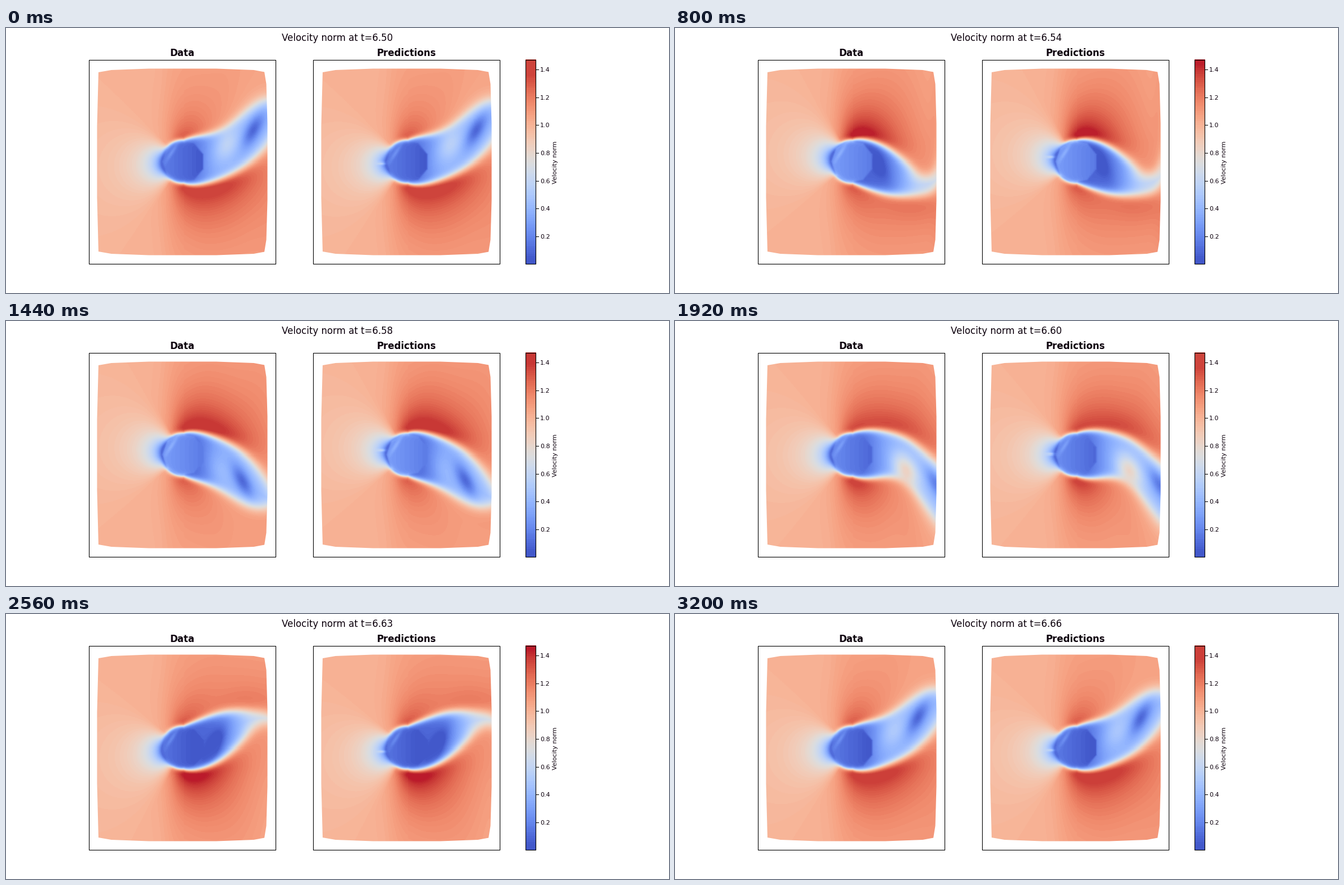
Recreate the animation shown at these times as a matplotlib script. Size 1183x473 px, loop 3.36 s.

```python
import numpy as np
import matplotlib
import matplotlib.pyplot as plt
from matplotlib.animation import FuncAnimation
from matplotlib.patches import Polygon, Rectangle

W, H, DPI = 1183, 473, 100
FRAMES, INTERVAL = 21, 160
PERIOD = 20.5            # shedding period, in frames
HALF = PERIOD / 2
VMAX, LEVELS = 1.469, 100
CX, CY, R = 316, 239, 37
EDGE = 38                # wake half width right at the cylinder
SHIFT = 400              # distance between the two panels
X0, X1, Y0, Y1 = 162, 468, 71, 407
INK = "#0c000c"

plt.rcParams["font.family"] = "DejaVu Sans"

xs = np.arange(X0, X1) + 0.5
X, Y = np.meshgrid(xs, np.arange(Y0, Y1) + 0.5)
DX, DY = X - CX, Y - CY
RAD = np.hypot(DX, DY)


def wave(k, peak, period=PERIOD):
    return np.cos(2 * np.pi * (k - peak) / period)


def sigmoid(v):
    return 0.5 * (1 + np.tanh(v / 2))


def blob(x, y, side, long, short, tilt=62):
    """Slanted Gaussian; side 1 leans up to the right, -1 down."""
    c, s = np.cos(np.radians(tilt)), -side * np.sin(np.radians(tilt))
    u = (X - x) * c + (DY - y) * s
    v = -(X - x) * s + (DY - y) * c
    return np.exp(-0.5 * ((u / long) ** 2 + (v / short) ** 2))


def facet_mask(sides=9):
    """Soft mask of the faceted cylinder."""
    dist = np.full(X.shape, -1e3)
    for n in range(sides):
        a = 2 * np.pi * (n + 0.5) / sides + np.pi
        flat = R * np.cos(np.pi / sides)
        dist = np.maximum(dist, DX * np.cos(a) + DY * np.sin(a) - flat)
    return sigmoid(-dist / 0.8)


FACETS = facet_mask()


def borders(k):
    """Upper and lower wake border for every pixel column."""
    run = np.maximum(xs - CX, 0)
    u = run / 152
    # the centre line flaps ever wider, later and more abruptly downstream
    lag = -3.7 + 3 * (np.maximum(run - 24, 0) / 128) ** 2
    snap = 0.1 + 2 * u
    centre = -72 * u ** 1.5 * np.tanh(snap * wave(k, lag)) / np.tanh(snap)
    # the wake pinches twice per period
    half = EDGE + 7 * (1 - np.exp(-run / 20)) - 18 * u ** 2
    half = half + 25 * u ** 2.3 * wave(k, 1.8 - 6.5 * (1 - u), HALF)
    nose = np.minimum(xs - CX, 0)
    half = np.where(xs < CX, np.sqrt(np.maximum(EDGE ** 2 - nose ** 2, 0)), half)
    return centre - half, centre + half


def fast_flow(out, age):
    """Extra speed outside one border; out is the distance from it."""
    life = (age % PERIOD) / PERIOD
    far = np.maximum(out, 0)
    fade = np.where(out > 0, np.exp(-np.maximum(out - 10, 0) / 60),
                    np.exp(np.minimum(out, 0) / 15))

    def hump(x, spread):
        return np.exp(-0.5 * ((X - x) / (spread + 0.5 * far)) ** 2)

    shoulder = 0.22 * hump(308, 33)
    patch = (0.42 * np.sin(np.pi * life ** 0.65)
             * hump(320 + 170 * life ** 1.5, 35 + 50 * life))
    rise = sigmoid((X - 298) / (7 + 0.15 * far))
    return fade * rise * np.hypot(shoulder, patch)


def vortex(side, age):
    """Speed change by one drifting vortex: dark core, pale centre."""
    a = age % PERIOD
    core = 0.3 * np.sqrt(max(np.sin(np.pi * a / 10.5), 0)) * (a < 10.5)
    rise = 57 * np.sin(np.pi * a / 13) ** 2
    pale = 0.5 * np.exp(-((a - 8.8) / 3) ** 2)
    lift = 30 - 1.5 * (a - 6.3) ** 2
    return (pale * blob(333 + 10 * a, -side * lift, side, 23, 14)
            - core * blob(350 + 15 * a, -side * rise, side, 22, 9))


def approach(k, notch):
    """Flow around the nose, with a swaying stagnation point."""
    turn = 8 / R * wave(k, 6.7)
    ahead = np.minimum(DX, 0)
    rho = R * R / np.maximum(ahead ** 2 + DY ** 2, R * R)
    c = np.cos(1.75 * (np.arctan2(DY, -ahead) + turn))
    c = np.where(DX > 0, -1, c)
    weight = np.where(c > 0, c, 0.08 * c) * np.exp(-np.maximum(DX, 0) / 60)
    speed = np.maximum(1 - rho * weight, 0.1) + 0.05 * sigmoid((X - 285) / 10)
    return speed + notch * np.exp(-((X - 272) / 8) ** 2
                                  - ((DY + R * turn + 1) / 2.5) ** 2)


def field(k, notch=0.0):
    """Speed on the pixel grid at frame k (may be fractional)."""
    top, bottom = borders(k)

    def steep(line):
        return np.sqrt(1 + np.where(xs < CX, 0, np.gradient(line)) ** 2)

    above = (top - DY) / steep(top)
    below = (DY - bottom) / steep(bottom)
    outer = approach(k, notch) + fast_flow(above, k) + fast_flow(below, k + HALF)

    # slow flow in the wake
    pulse = wave(k, 5.5, HALF)
    inner = 0.08 + 0.3 * sigmoid((X - 372 - 22 * pulse) / 13)
    inner += 0.1 * (1 + pulse) * sigmoid((X - 430) / 12)
    inner += vortex(1, k + 6) + vortex(-1, k + 6 + HALF)
    inner = np.clip(inner, 0.04, 0.95)

    # body
    tone = 0.15 + 0.09 * wave(k, 7) - 0.07 * DX / R
    tone = tone + 0.1 * blob(296, -16, 1, 13, 2.5, 57)
    inner = inner + FACETS * (tone - inner)

    depth = np.where(DX < 0, EDGE - RAD, np.minimum(-above, -below))
    soft = 4 + 0.07 * np.maximum(DX, 0)
    mask = 0.5 * (1 + np.tanh(depth / soft))
    return outer * (1 - mask) + inner * mask


def colours(speed, k):
    v = (np.floor(speed / VMAX * LEVELS) + 0.5) / LEVELS
    high = 0.95 + 0.03 * wave(k, 6, HALF)
    return matplotlib.colormaps["coolwarm"](np.clip(v, 0.03, high))


fig = plt.figure(figsize=((W + 1e-6) / DPI, (H + 1e-6) / DPI), dpi=DPI,
                 facecolor="white")
ax = fig.add_axes([0, 0, 1, 1])
ax.axis("off")

# upper half of the mesh outline, completed by its mirror image
upper = np.array([(162.5, 175), (165, 79), (188, 75), (255, 72.5), (375, 72.5),
                  (442, 75), (461, 78.5), (464.5, 100), (466.5, 170)])
outline = np.vstack([upper, (upper * [1, -1] + [0, 2 * CY])[::-1]])


def image(x0, x1, y0, y1):
    return ax.imshow(np.ones((2, 2, 4)), extent=(x0, x1, y1, y0),
                     aspect="auto", interpolation="nearest")


def box(x0, x1):
    ax.add_patch(Rectangle((x0, 57), x1 - x0, 364, fill=False,
                           ec="black", lw=0.8, zorder=3))


panels = []
for shift, name in ((0, "Data"), (SHIFT, "Predictions")):
    im = image(X0 + shift, X1 + shift, Y0, Y1)
    im.set_clip_path(Polygon(outline + [shift, 0], transform=ax.transData))
    panels.append(im)
    box(148 + shift, 481 + shift)
    ax.text(314.8 + shift, 50, name, ha="center", va="baseline",
            fontsize=12, weight="bold", color=INK)

bar = image(927, 945, 57, 421)
box(927, 945)
ramp = np.linspace(VMAX, 0, 364, endpoint=False)[:, None]
for n in range(1, 8):
    y = 421.3 - n * 49.58
    ax.plot([946, 950], [y, y], color="black", lw=0.8)
    ax.text(953, y, f"{n * 0.2:.1f}", va="center_baseline", fontsize=8, color=INK)
ax.text(979.5, 239.5, "Velocity norm", rotation=90, ha="center",
        va="center", fontsize=8, color=INK)
title = ax.text(W / 2, 8.6, "", ha="center", va="top", fontsize=12, color=INK)

ax.set_xlim(0, W)
ax.set_ylim(H, 0)


def draw(k):
    panels[0].set_data(colours(field(k), k))
    panels[1].set_data(colours(field(k - 0.15, notch=0.2), k))
    bar.set_data(colours(ramp, k))
    title.set_text(f"Velocity norm at t={6.5025 + 0.0081 * k:.2f}")
    return [*panels, bar, title]


anim = FuncAnimation(fig, draw, frames=FRAMES, interval=INTERVAL,
                     init_func=lambda: draw(0), repeat=True)
plt.show()
```
